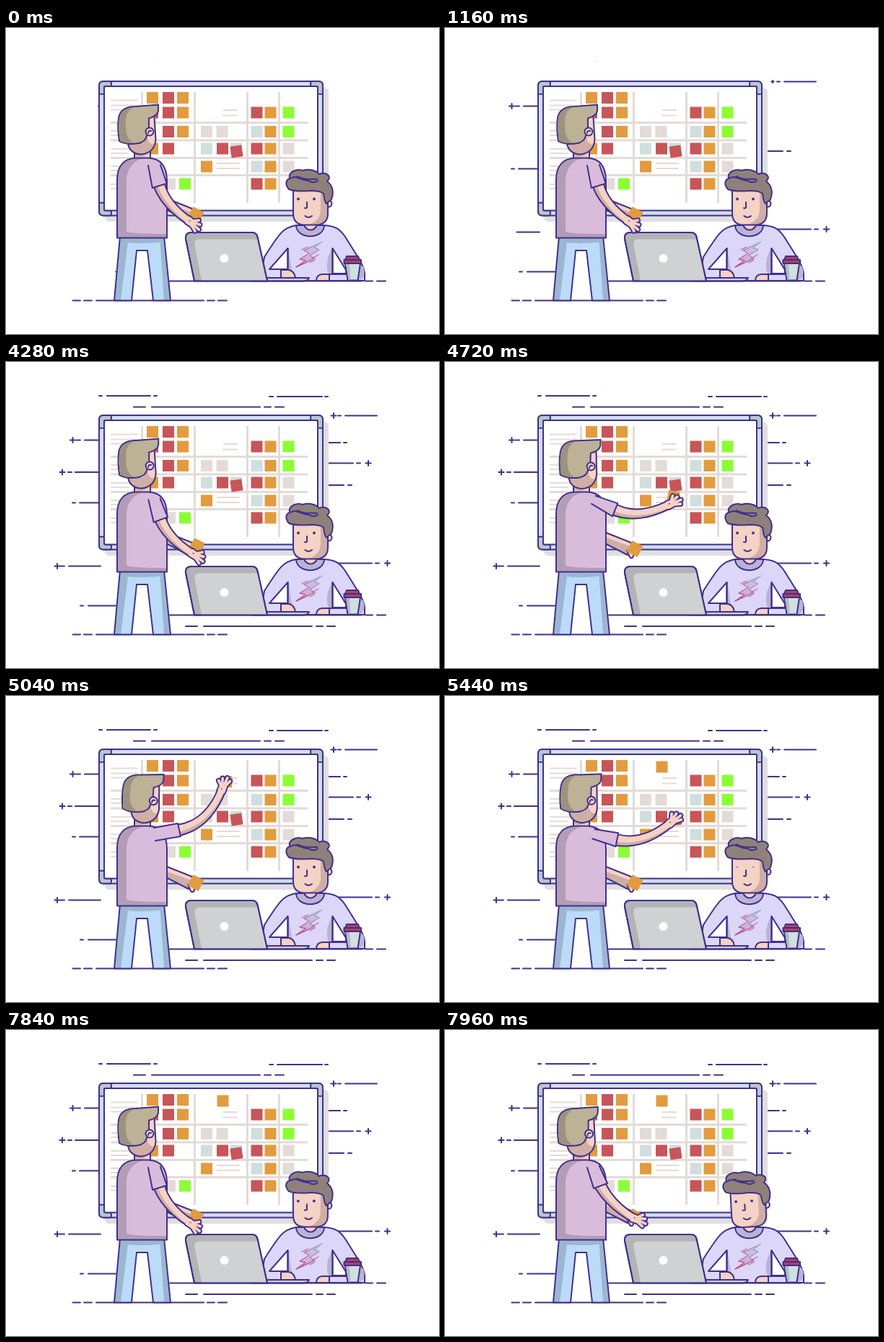
Write an HTML page that moves like this. It is 600x425 px and loops after 8 s.

```html
<!DOCTYPE html>
<html lang="en">
<head>
<meta charset="utf-8">
<title>Planning at the board</title>
<style>
html, body { margin: 0; width: 100%; height: 100%; overflow: hidden; background: #fff; }
svg { display: block; width: 100vw; height: 100vh; }
.ink { stroke: #41308c; stroke-width: 2; stroke-linecap: round; stroke-linejoin: round; }
.none { fill: none; }
.skin { fill: #f4d2c4; }
.dim { fill: #cfaea6; }
.sweater { fill: #dcd6f8; }
.sweaterDim { fill: #b9b4d4; }
.shirt { fill: #d9bcdc; }
.shirtDim { fill: #b39db6; }
.jeans { fill: #bcdbf9; }
.jeansDim { fill: #9cb6d2; }
.grid { stroke: #e3dbd8; stroke-width: 3; fill: none; }
.text { stroke: #e3dbd8; stroke-width: 2.2; fill: none; stroke-linecap: round; }
.finger { stroke-linecap: round; stroke-linejoin: round; fill: none; }
</style>
</head>
<body>
<svg viewBox="0 0 600 425">
  <defs>
    <linearGradient id="bolt" x1="0" y1="1" x2="1" y2="0">
      <stop offset="0.1" stop-color="#c2477f"/><stop offset="0.9" stop-color="#9fb0d4"/>
    </linearGradient>
  </defs>
  <circle cx="209.5" cy="46.5" r="0.6" fill="#aaa"/>
  <path id="lines" class="ink none"/>

  <!-- board -->
  <rect x="137" y="83" width="310" height="186" rx="6" fill="#dfdee1"/>
  <rect class="ink" x="129" y="74" width="310" height="186.500" rx="6" fill="#d2dcec"/>
  <g id="corners"></g>
  <rect class="ink" x="136" y="81" width="296" height="172.500" rx="2" fill="#fff"/>
  <path class="grid" d="M188.500 89V243M261.500 89V243M334.500 89V243M378.500 89V243M145 131.500H418M145 156H418M145 180.500H418M145 204.500H418"/>
  <path class="text" d="M146 100.500H182M146 107.500H182M146 113.500H165M146 143H182M146 149H170M146 168H182M146 174H170M146 192H182M146 198H170M146 217H182M146 223H170M302 114H320M301 121.500H320M293 188H323M293 195H323"/>
  <g id="notes"></g>

  <!-- seated colleague -->
  <path class="ink sweater" d="M402 274C384 277 379 285 358 318L352 351H497V343C498 333 487 317 470 290C462 278 455 275 441 274Z"/>
  <path class="sweaterDim" d="M391 307V346H400C394 334 394 318 391 307ZM452 306V341H447C442 330 446 316 452 306ZM402 275C404 294 439 294 441 275ZM495 331C499 343 495 350 487 350H476Q490 346 491 331Z"/>
  <path class="ink" fill="#fff" d="M390.500 306L365 335H390.500ZM452.500 306L471 336V341H452.500Z"/>
  <path class="ink none" d="M390.500 306V345M452.500 306V345M402 275C404 294 439 294 441 275"/>
  <path class="ink skin" d="M414 266V276Q422 285 430 276V266Z"/>
  <path class="ink skin" d="M381 336H392Q400 338 401 347H381Z"/>
  <path class="ink skin" d="M449 342H438Q430 343 430 351H449Z"/>
  <path class="ink sweater" d="M473 342H448V351H488"/>
  <path d="M438 297L413 309L420 313L407 321L415 323L402 332L428 320L421 316L434 308L427 305Z" fill="url(#bolt)" fill-opacity="0.35" stroke="url(#bolt)" stroke-width="1.400" stroke-linejoin="round"/>
  <path d="M433 315L424 320M428 322L421 326M418 304L410 308M412 326L408 329" fill="none" stroke="#b7699b" stroke-width="1.200" stroke-linecap="round"/>
  <g id="sitter">
    <circle class="ink skin" cx="447" cy="244" r="4.500"/>
    <path class="skin" d="M398 222V257Q398 273 413 273.500H430Q446 273 446 257V222Z"/>
    <path class="dim" d="M436 226V252Q436 267 420 273H431Q446 272 446 257V226Z"/>
    <path class="ink none" d="M398 222V257Q398 273 413 273.500H430Q446 273 446 257V238"/>
    <path class="ink" fill="#8f817a" d="M392 224C386 217 388 211 393 209C391 200 402 195 411 198C420 195 430 198 434 203C439 201 444 202 447 205C449 208 447 211 445 213C452 218 455 227 451 238C449 241 446 241 444 244C441 241 441 235 440 230C437 227 430 226 422 226C410 227 400 227 392 224Z"/>
    <path class="ink none" stroke-width="1.500" d="M394 209C404 203 409 213 420 212M404 206C414 212 421 209 431 210M421 213Q427 216 432 212"/>
    <g id="eyes" fill="#41308c"><circle cx="405" cy="237.500" r="1.900"/><circle cx="427" cy="237.500" r="1.900"/></g>
    <path class="ink none" d="M417 242V247Q418 251 414 250M414.500 261Q419 265 424 261"/>
  </g>

  <!-- desk -->
  <path class="ink" fill="#cfd2d4" d="M340 347H420Q419 351 412 351.500H340Z"/>
  <path class="ink" fill="#b3b3b6" d="M257 284H341Q347 284 348.500 290L362 351.500H261L249 293Q248 284 257 284Z"/>
  <path fill="#cfd2d3" d="M268 293.500H348.500L361 350.500H271L261.500 302Q260 293.500 268 293.500Z"/>
  <circle cx="302.500" cy="320" r="6" fill="#fff"/>
  <path class="ink none" d="M257 284H341Q347 284 348.500 290L362 351.500H261L249 293Q248 284 257 284ZM227 351.500H493M498 351.500H508M514 351.500H526M92.500 378.500H103M108 378.500H119M125 378.500H274M279 378.500H289M294 378.500H306"/>
  <path class="ink" fill="#d0dfdf" d="M470 327H491L487.500 350.500H473.500Z"/>
  <path fill="#aebdc4" d="M471 328H476L477.500 349.500H474.500Z"/>
  <path class="ink" fill="#b0405f" d="M472 317H488L490 322H492V327H468.500V322H470Z"/>
  <path class="ink none" d="M470 322H490"/>

  <!-- standing colleague -->
  <g class="ink">
    <path class="dim" d="M218 235L258 251L262 262L253 268L218 250Z"/>
    <path class="skin" d="M252 262L256 271Q259 274 261 270L262 260Z"/>
  </g>
  <path d="M218 236.500L256 251.500L257 256L218 242Z" class="skin"/>
  <rect x="-8.500" y="-8.500" width="17" height="17" transform="translate(263 259.500) rotate(28)" fill="#e29b3e"/>
  <path class="jeans" d="M158 289H219L228 378.500H204L196 309H180L174 378.500H150Z"/>
  <path class="jeansDim" d="M158 289H170L159 378.500H150ZM213 289H219L228 378.500H219ZM160 289H219V297Q185 301 160 297Z"/>
  <path class="ink none" d="M158 289L150 378.500H174L181 309H196L204 378.500H228L219 289"/>
  <path class="ink skin" d="M178 165H200V182H178Z"/>
  <path class="dim" d="M179 168H199V173Q190 181 179 178Z"/>
  <path class="shirt" d="M154 291.500V211C154 192 163 181 181 180.500H197C215 181 223 192 223 213V291.500Z"/>
  <path class="shirtDim" d="M154 291.500V211C154 192 163 181 181 180.500H192C174 185 167 197 167 214V282Q168 286 223 286V291.500Z"/>
  <path class="ink none" d="M154 291.500V211C154 192 163 181 181 180.500H197C215 181 223 192 223 213V291.500Z"/>
  <g id="head">
    <path class="skin" d="M170 150V168Q178 176 190 175.500Q207 173 207 155V120H190Z"/>
    <path class="dim" d="M168 160L172 170Q181 177 192 175Q204 171 206 160Q203 164 197 157L196 150L190 160Z"/>
    <path class="ink none" d="M169 161Q172 175 188 175.500Q206 173 207.500 155L205.500 123"/>
    <path class="ink" fill="#bdb196" d="M157 157C155 145 155 133 156 125C158 113 167 109 180 109L211 106.500V115Q210 122 198 125.500V138L195 150Q193 158 184 160C174 162 163 161 157 157Z"/>
    <path fill="#9c927f" d="M158 156.500C156 143 156 133 157 126C159 114 168 110.500 178 110C168 114 166 121 166 130C166 144 166 153 177 160Q163 160.500 158 156.500Z"/>
    <circle class="ink skin" cx="199" cy="144" r="5.500"/>
    <path class="ink none" stroke-width="1.500" d="M197 146Q197 142 201 143"/>
  </g>
  <rect id="held" x="-8" y="-8" width="16" height="16" fill="#e29b3e"/>
  <path id="fingerInk" class="finger" stroke="#41308c" stroke-width="7.500"/>
  <path id="armFill" class="skin"/>
  <path id="armDim" class="dim"/>
  <path id="armInk" class="ink none"/>
  <path id="fingerSkin" class="finger" stroke="#f4d2c4" stroke-width="3.700"/>
  <path id="sleeveFill" class="shirt"/>
  <path id="sleeveInk" class="ink none"/>
</svg>
<script>
const LOOP = 8000, RAD = Math.PI / 180;
const $ = id => document.getElementById(id);
const set = (id, name, value) => $(id).setAttribute(name, value);
const clamp = v => Math.max(0, Math.min(1, v));
const span = (t, a, b) => clamp((t - a) / (b - a));
const wave = u => 0.5 - 0.5 * Math.cos(Math.PI * u);
const mix = (a, b, u) => a.map((v, i) => v + (b[i] - v) * u);
const polar = ([x, y], r, deg) => [x + r * Math.cos(deg * RAD), y + r * Math.sin(deg * RAD)];
const pt = p => p.map(v => v.toFixed(2)).join(" ");

// Sticky notes: one string per row, "x" positions follow the colour key.
const COLORS = { o: "#e29b3e", r: "#c75559", g: "#8bfd35", p: "#e3dbd8", b: "#d0dedd" };
const ROWS = {
  89: "o195 r217 o237",
  109.5: "r195 r217 o237 r339.5 o358.5 g383.5",
  136: "r217 o237 p270 p291.500 b339.5 o358.5 g383.5",
  159.5: "o195 r217 b270 r292 b311 r339.5 o358.5 p383.5",
  184.5: "o270 b339.5 o358.5 p383.5",
  208.5: "p219 g240 r339.5 o358.5"
};
const square = (fill, place) => `<rect width="16" height="16" fill="${fill}" transform="${place}"/>`;
$("notes").innerHTML = Object.entries(ROWS).map(([y, row]) => row.split(" ")
  .map(n => square(COLORS[n[0]], `translate(${n.slice(1)} ${y})`)).join("")).join("")
  + square(COLORS.r, "translate(319.500 171.500) rotate(-8) translate(-8 -8)");

$("corners").innerHTML = [[129, 74, 1, 1], [439, 74, -1, 1], [129, 260.5, 1, -1], [439, 260.5, -1, -1]]
  .map(([x, y, sx, sy]) => `<path class="ink" fill="#b5c7cc" transform="translate(${x} ${y}) scale(${sx} ${sy})"
    d="M0 17V6Q0 0 6 0H15Q17 0 17 3.500T15 7H9Q7 7 7 9V17Q3.500 19 0 17Z"/>`).join("");

// Speed lines: y, start, end, x of the plus (0 for none), then dash ends in growing order.
const LINES = [
  [108.5, 0, 880, 92.5, 128, 109, 103, 98],
  [195.5, 200, 1000, 0, 128, 102, 96, 92],
  [338.5, 0, 800, 0, 152, 114, 107, 103],
  [74.5, 300, 1080, 454, 514, 470, 464, 460],
  [171, 0, 800, 0, 440, 468, 474, 479],
  [279.5, 300, 900, 528.5, 459, 507, 512, 517],
  [283.5, 840, 1400, 71, 131, 87, 81, 76],
  [47, 1200, 1640, 0, 209, 205, 200, 140, 133, 129],
  [153, 1400, 1850, 78, 128, 96, 91, 86],
  [140.5, 1500, 2050, 502, 440, 481, 486, 491],
  [62.5, 1800, 2500, 0, 385, 373, 367, 358, 352, 202, 193, 177],
  [48, 2560, 3000, 0, 365, 370, 376, 438, 442, 446],
  [112, 2700, 3100, 0, 440, 463, 468, 472],
  [367, 3050, 4000, 0, 456, 445, 439, 430, 424, 274, 265, 249]
];

function linePath(t, [y, t0, t1, plus, ...xs]) {
  const u = span(t, t0, t1), s = Math.sign(xs[1] - xs[0]);
  const tip = xs[0] + (xs[xs.length - 1] - xs[0]) * u;
  let d = "";
  for (let i = 0; u && i < xs.length; i += 2) {
    if ((tip - xs[i]) * s <= 0) break;
    d += `M${xs[i]} ${y}H${(tip - xs[i + 1]) * s < 0 ? tip.toFixed(2) : xs[i + 1]}`;
  }
  const r = 3.6 * span(t, t1, t1 + 180);
  if (plus && r) d += `M${plus - r} ${y}h${2 * r}M${plus} ${y - r}v${2 * r}`;
  return d;
}

// Arm pose: cuff angle, cuff distance, cuff tilt, cuff half width, upper length and
// angle, fore length and angle, hand angle, then the two sleeve roots.
const REST  = [82, 27.3, 73, 10.4, 28.5, 71.6, 38.8, 34.5, 38, 197, 191, 214, 190];
const REACH = [-11, 31.6, -12.5, 9.2, 41, -11, 51.6, -68.4, -68, 207, 201, 205, 183];
const STICK = [-22, 32, -24, 9.2, 43, -22, 56, -73.5, -76, 207, 201, 205, 182];
const OFFER = [75, 25.3, 70, 10.1, 32, 61, 35, 29, 22, 197, 191, 214, 189];
const SHOULDER = [209, 192], KNEE = 0.943;
const FINGERS = [[10, -9], [15, -5], [18, 1], [15, 6]];

function drawArm(pose, t, q) {
  const [ca, cd, tilt, half, l1, a1, l2, a2, ha, bx, by, tx, ty] = pose;
  const p0 = polar(SHOULDER, cd, ca), p1 = polar(p0, l1, a1), p2 = polar(p1, l2, a2);
  const low = [polar(p0, 8, a1 + 90), polar(p1, 6.5, (a1 + a2) / 2 + 90), polar(p2, 5.5, a2 + 90)];
  const top = [polar(p0, 7.5, a1 - 90), polar(p1, 6.5, (a1 + a2) / 2 - 90), polar(p2, 5.5, a2 - 90)];
  const curve = (a, b, c) => `${pt(a)}Q${pt(b)} ${pt(c)}`;
  const lowD = "M" + curve(...low);
  set("armFill", "d", lowD + "L" + curve(top[2], top[1], top[0]) + "Z");
  const in0 = polar(p0, 2.5, a1 + 90), in1 = polar(p1, 1.5, (a1 + a2) / 2 + 90), in2 = polar(p2, 4, a2 + 90);
  set("armDim", "d", lowD + "L" + curve(in2, in1, in0) + "Z");
  set("armInk", "d", lowD + "M" + curve(...top));

  const local = (x, y) => polar(polar(p2, x, ha), y, ha + 90);
  const palm = `M${pt(local(-2, -3.5))}L${pt(local(6, -3))}L${pt(local(7, 3))}L${pt(local(-2, 3.5))}L${pt(local(4, 0))}`;
  const fingers = palm + FINGERS.map(([x, y]) => `M${pt(local(4, y * 0.3))}L${pt(local(x, y))}`).join("");
  set("fingerInk", "d", fingers);
  set("fingerSkin", "d", fingers);

  const low2 = polar(p0, half, tilt + 90), top2 = polar(p0, half, tilt - 90);
  const sleeve = `M${bx} ${by}L${pt(low2)}L${pt(top2)}L${tx} ${ty}`;
  set("sleeveFill", "d", sleeve + "Z");
  set("sleeveInk", "d", sleeve);

  const stuck = t >= 5200;
  const at = stuck ? [300.5, 98.5] : [p2[0] + 6, p2[1] - 11];
  set("held", "transform", `translate(${pt(at)}) rotate(${stuck ? 0 : 28 * (1 - q)})`);
  set("held", "visibility", t > 4200 ? "visible" : "hidden");
}

function draw(t) {
  set("lines", "d", LINES.map(l => linePath(t, l)).join(""));
  const q = t < 5200 ? wave(span(t, 4160, 5200)) : 1 - wave(span(t, 5220, 5800));
  const offer = span(t, 7800, 7960) ** 2;
  const pose = offer ? mix(REST, OFFER, offer)
    : q < KNEE ? mix(REST, REACH, q / KNEE) : mix(REACH, STICK, (q - KNEE) / (1 - KNEE));
  drawArm(pose, t, q);
  const lean = q + offer * 0.1;
  set("head", "transform", `translate(${3.5 * lean} ${lean}) rotate(${4 * lean} 188 175)`);
  set("sitter", "transform", `rotate(${-3 * offer} 422 274)`);
  const blink = 1 - 0.85 * Math.sin(Math.PI * span(t, 5300, 5520));
  set("eyes", "transform", `translate(0 237.500) scale(1 ${blink}) translate(0 -237.500)`);
}

const start = performance.now();
function tick() {
  draw((performance.now() - start) % LOOP);
  requestAnimationFrame(tick);
}
draw(0);
tick();
</script>
</body>
</html>
```
